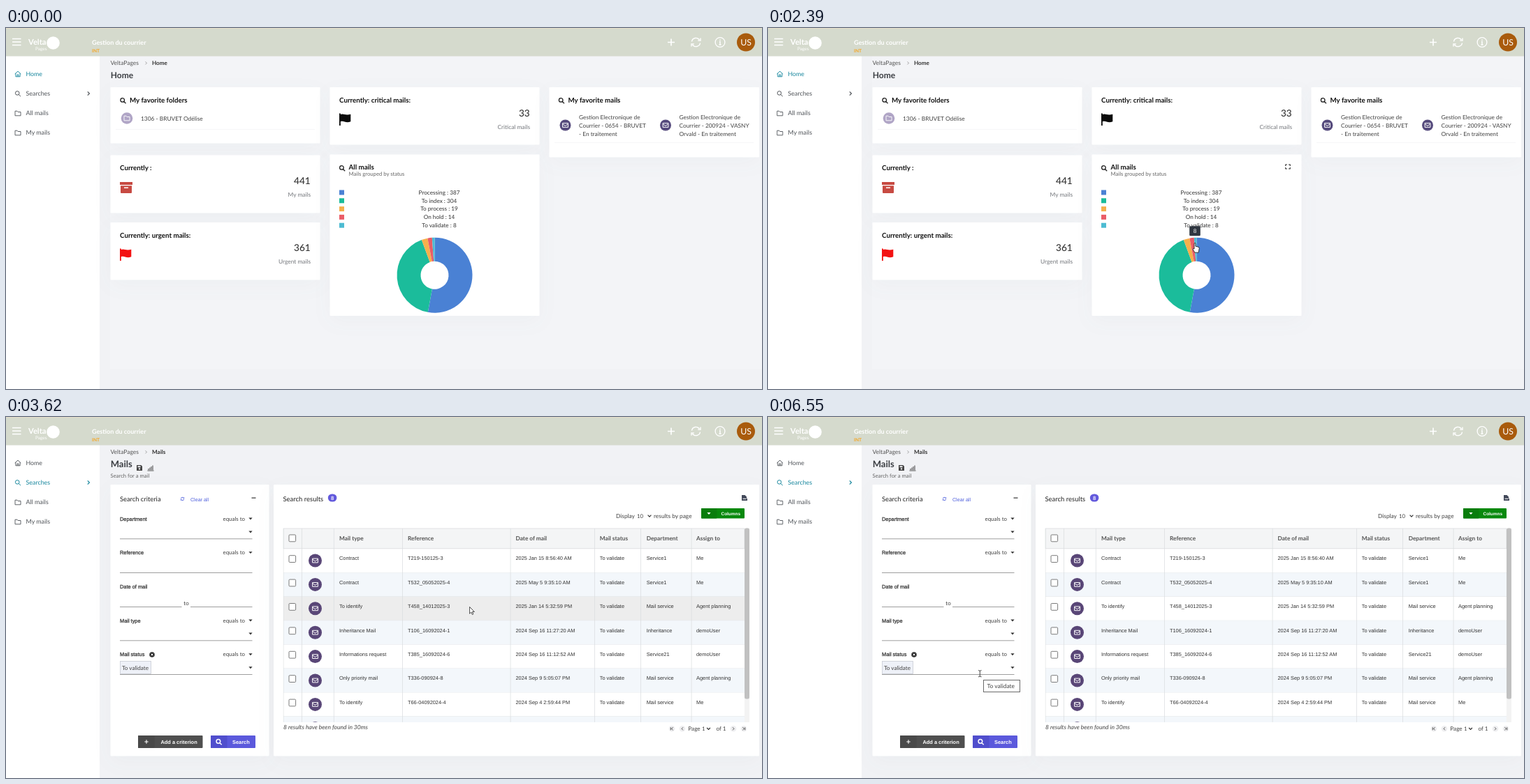
Write an HTML page that moves like this. It is 1082x518 px and loops after 7.17 s.

```html
<!DOCTYPE html>
<html lang="en">
<head>
<meta charset="utf-8">
<title>Mail dashboard</title>
<style>
html, body { margin: 0; width: 100%; height: 100%; overflow: hidden; background: #f1f2f5 }
svg { display: block; width: 100vw; height: 100vh; font-family: Lato, sans-serif; text-rendering: geometricPrecision }
.arial { font-family: "Liberation Sans", Arial, sans-serif }
.card { fill: #fff; filter: drop-shadow(0 8px 14px rgba(70, 80, 100, .03)) }
</style>
</head>
<body>
<svg id="stage" viewBox="0 0 1082 518"></svg>
<script>
const LOOP = 7170, MAILS_AT = 2850, NAMES_AT = 3080, TIP_AT = 6550;
const BOLD = 'font-weight="700"', END = 'text-anchor="end"', MID = 'text-anchor="middle"';
const ARIAL = 'class="arial"', TEAL = '#16869d';

// Drawing helpers returning SVG markup
const text = (x, y, s, size = 8.3, fill = '#444', more = '') =>
  `<text x="${x}" y="${y}" font-size="${size}" fill="${fill}" ${more}>${s}</text>`;
const rect = (x, y, w, h, fill, more = '') =>
  `<rect x="${x}" y="${y}" width="${w}" height="${h}" fill="${fill}" ${more}/>`;
const circle = (x, y, r, fill, more = '') => `<circle cx="${x}" cy="${y}" r="${r}" fill="${fill}" ${more}/>`;
const fill = (x, y, d, color) => `<path transform="translate(${x} ${y})" d="${d}" fill="${color}"/>`;
const line = (x, y, d, color, width = 1) =>
  `<path transform="translate(${x} ${y})" d="${d}" fill="none" stroke="${color}" stroke-width="${width}"/>`;
const card = (x, y, w, h) => rect(x, y, w, h, '#fff', 'class="card" rx="1"');

// Icons, centred on x, y
const lens = (x, y, c, w = 1.3) => line(x, y, 'M2 -.6A2.8 2.8 0 1 1 -3.6 -.6A2.8 2.8 0 1 1 2 -.6M1.2 1.5L4 4.2', c, w);
const folder = (x, y, c) => line(x, y, 'M-4 3.3V-3.3H-1L0 -2H4V3.3Z', c, .9);
const house = (x, y, c) => line(x, y, 'M-4.3 0L0 -3.9L4.3 0M-3.1 -1V3.8H3.1V-1M-1 3.8V1H1V3.8', c, .9);
const caret = (x, y, c = '#333') => fill(x, y, 'M-2.6 -1.4H2.6L0 1.5Z', c);
const chevron = (x, y, c = '#333') => line(x, y, 'M-2.4 -1.3L0 1.2L2.4 -1.3', c, 1.2);
const plus = (x, y, r, w) => line(x, y, `M${-r} 0H${r}M0 ${-r}V${r}`, '#fff', w);
const refresh = (x, y, s, c, w) => `<g transform="translate(${x} ${y}) scale(${s})">` +
  line(0, 0, 'M-6 -1A6 6 0 0 1 5 -3.3M6.5 -6V-2.4H2.7M6 1A6 6 0 0 1 -5 3.3M-6.5 6V2.4H-2.7', c, w) + '</g>';
const envelope = (x, y, r, c) => circle(x, y, r, c) +
  line(x, y, 'M-3.9 -2.9H3.9V2.9H-3.9ZM-3.9 -1.8L0 .9L3.9 -1.8', '#fff', 1);
const flag = (x, y, c) => fill(x, y, 'M0 0h1.8v17.5h-1.8zM1.8 1.6c4-2.2 6.5 2 14.5-.4v10.6c-7 2.8-10-1.8-14.5 0z', c);

function header() {
  return rect(0, 0, 1082, 40.5, '#d5dacd') + rect(0, 0, 1082, 1, '#e6dfca') +
    line(9, 15.5, 'M0 0H12.5M0 4.5H12.5M0 9H12.5', '#fff', 1.6) +
    circle(67.5, 21.5, 9.3, '#fff') +
    text(32, 24, 'Velta', 11.2, '#fff', BOLD) + text(42, 31.5, 'Pages', 6.5, '#fff') +
    text(123, 24, 'Gestion du courrier', 9, '#fff', BOLD) + text(123, 35, 'INT', 6.6, '#f5a623', BOLD) +
    plus(952, 20.5, 5, 1.6) + refresh(987.5, 20.5, 1, '#fff', 1.4) +
    circle(1022, 20.5, 6.9, 'none', 'stroke="#fff" stroke-width="1.3"') +
    line(1022, 20.5, 'M0 -4V-2.3M-1 -.7H0V3.5M-1.5 3.5H1.5', '#fff', 1.4) +
    circle(1059, 20.5, 13, '#a95b0c') + text(1059, 24.8, 'US', 12.3, '#fff', MID);
}

function frame(title, size, home) {
  const grey = '#4f5358', h = home ? TEAL : grey, s = home ? grey : TEAL;
  return rect(0, 40, 134, 478, '#fff') +
    house(17, 66, h) + text(28.5, 69, 'Home', 8.8, h) +
    lens(17, 94, s, 1) + text(28.5, 97, 'Searches', 8.9, s) + line(118, 94, 'M-1.2 -2.6L1.4 0L-1.2 2.6', s, 1.2) +
    folder(17, 122.5, grey) + text(28.5, 125.3, 'All mails', 8.9, grey) +
    folder(17, 150.5, grey) + text(28.5, 153.3, 'My mails', 8.9, grey) +
    text(149.5, 53, 'VeltaPages', 8.5, '#555') + line(200.5, 50.3, 'M-1 -2L1 0L-1 2', '#888', .8) +
    text(209, 53.3, title, 8.1, '#333', BOLD) + text(149.7, 72.3, title, size, '#3a3d42', BOLD);
}

function donut(cx, cy, R, r, parts) {
  const total = parts.reduce((sum, p) => sum + p[1], 0);
  const at = (a, d) => `${cx + d * Math.sin(a)} ${cy - d * Math.cos(a)}`;
  let a = 0;
  return parts.map(([, n, color]) => {
    const b = a + n / total * 2 * Math.PI, big = +(b - a > Math.PI);
    const d = `M${at(a, R)}A${R} ${R} 0 ${big} 1 ${at(b, R)}L${at(b, r)}A${r} ${r} 0 ${big} 0 ${at(a, r)}Z`;
    a = b;
    return fill(0, 0, d, color);
  }).join('');
}

function dashboard() {
  const title = (x, y, s) => text(x, y, s, 9.75, '#111', BOLD);
  const count = (x, y, n, label) => text(x, y, n, 13.6, '#333', END + ' font-weight="500"') +
    text(x + .3, y + 18, label, 8.35, '#74777c', END);
  const lines = (x, ...rows) => rows.map((s, i) => text(x, 131 + 12 * i, s)).join('');
  const parts = [['Processing', 387, '#4a81d4'], ['To index', 304, '#1bbc9b'], ['To process', 19, '#f6b04c'],
    ['On hold', 14, '#ea5d68'], ['To validate', 8, '#4dbbd2']];
  return rect(149, 40, 933, 449, '#f3f4f7') + frame('Home', 12, true) +
    card(149.5, 85, 300, 80.5) + lens(167.5, 104, '#222') + title(177, 107, 'My favorite folders') +
    circle(173, 129.5, 8.3, '#b0a5c6') + folder(173, 129.5, '#fff') +
    text(193, 133, '1306 - BRUVET Odélise', 8.4) + rect(157, 145, 285, .6, '#f1f1f3') +
    card(149.5, 182.5, 300, 83) + title(163, 204, 'Currently :') + count(435.7, 224, 441, 'My mails') +
    fill(163, 221, 'M0 0H18V4H0ZM1 5.2H17V15Q17 16 16 16H2Q1 16 1 15ZM6 7.5V9H12V7.5Z', '#c74a42') +
    card(149.5, 279, 300, 82.5) + title(163, 300.5, 'Currently: urgent mails:') +
    count(435.7, 320.3, 361, 'Urgent mails') + flag(163, 316.5, '#f31212') +
    card(463.5, 85, 300, 82.5) + title(477, 107, 'Currently: critical mails:') +
    count(749.7, 126.5, 33, 'Critical mails') + flag(477, 122.5, '#0b0b0b') +
    card(777.5, 85, 300.5, 100.5) + lens(795, 104, '#222') + title(804.5, 107, 'My favorite mails') +
    envelope(800.5, 139.5, 8, '#564b7d') + envelope(944, 139.5, 8, '#564b7d') +
    lines(820, 'Gestion Electronique de', 'Courrier - 0654 - BRUVET', '- En traitement') +
    lines(963.5, 'Gestion Electronique de', 'Courrier - 200924 - VASNY', 'Orvald - En traitement') +
    rect(785, 164, 285, .6, '#f1f1f3') +
    card(463.5, 181.5, 300, 231.5) + lens(481.2, 201, '#222') + title(490.5, 203.3, 'All mails') +
    text(490.5, 212.3, 'Mails grouped by status', 7.7, '#666') +
    parts.map(([name, n, color], i) => rect(477, 232.5 + 11.8 * i, 7, 7, color) +
      text(620, 238.7 + 11.8 * i, `${name} : ${n}`, 8.2, '#333', MID)).join('') +
    donut(613.5, 354.7, 54, 20, parts) +
    `<g id="expand">${line(744, 199, 'M-3.3 -1V-3H-1M1 -3H3.3V-1M3.3 1V3H1M-1 3H-3.3V1', '#333', 1.1)}</g>`;
}

function criteria() {
  const label = (y, s) => text(163, y + 2.7, s, 7.4, '#333', ARIAL + ' stroke="#333" stroke-width=".25"');
  const rule = (y, x = 163, w = 189.5) => rect(x, y, w, .9, '#949494');
  const field = (y, s, list) => label(y, s) + text(310.5, y + 2.5, 'equals to', 7.9, '#444') + caret(350, y) +
    (list ? caret(350, y + 19) : '') + rule(y + 28.4);
  const button = (x, w, s, c, dark, tx) => rect(x, 457, w, 18, c, 'rx="1"') + rect(x, 457, 23.5, 18, dark, 'rx="1"') +
    text(tx, 468.7, s, 7.4, '#fff', ARIAL + BOLD);
  return card(149.5, 97, 227, 389.5) + text(163, 120.5, 'Search criteria', 9.3, '#333', 'font-weight="500"') +
    refresh(252.5, 117.5, .36, '#4a5bdc', 2.4) + text(264, 120.5, 'Clear all', 7.1, '#4a5bdc', ARIAL) +
    rect(351.5, 115.5, 6, 1.2, '#333') +
    field(146, 'Department', true) + field(194.6, 'Reference') +
    label(243.5, 'Date of mail') + rule(272, 163, 88.5) + rule(272, 264, 88.5) + text(254.3, 270, 'to', 8) +
    field(292, 'Mail type', true) + field(340.7, 'Mail status', true) +
    circle(209, 341, 3.8, '#333') + line(209, 341, 'M-1.3 -1.3L1.3 1.3M1.3 -1.3L-1.3 1.3', '#fff', 1) +
    rect(163.5, 350.5, 44, 18, '#eef1f8', 'stroke="#c9ccd4" stroke-width=".8"') + text(166, 363, 'To validate', 8.15) +
    button(189, 92.5, 'Add a criterion', '#4f4f4f', '#494949', 221.5) + plus(201, 466, 2.7, 1.1) +
    button(293, 64, 'Search', '#5b59dc', '#504ecd', 324) + lens(304.7, 466, '#fff', 1.5);
}

const TOP = 189, ROW = 34.4, COLUMNS = [477, 575, 729.5, 849.7, 916.7, 988];
const MAILS = `Contract|T219-150125-3|2025 Jan 15 8:56:40 AM|Service1|Me
Contract|T532_05052025-4|2025 May 5 9:35:10 AM|Service1|Me
To identify|T458_14012025-3|2025 Jan 14 5:32:59 PM|Mail service|agent
Inheritance Mail|T106_16092024-1|2024 Sep 16 11:27:20 AM|Inheritance|demoUser
Informations request|T385_16092024-6|2024 Sep 16 11:12:52 AM|Service21|demoUser
Only priority mail|T336-090924-8|2024 Sep 9 5:05:07 PM|Mail service|agent
To identify|T66-04092024-4|2024 Sep 4 2:59:44 PM|Mail service|Me
|||| `.split('\n').map(row => row.split('|'));

function results() {
  const box = y => rect(405, y - 5, 9.6, 9.8, '#fff', 'rx="1.2" stroke="#6b6b6b" stroke-width=".9"');
  const row = ([type, ref, date, dept, who], i) => {
    const y = TOP + ROW * i;
    const cells = [type, ref, date, type && 'To validate', dept, who];
    return rect(397, y, 660, ROW, '#fff', 'class="row"') + rect(397, y + ROW - .4, 660, .7, '#dcdfe3') +
      box(y + 14.7) + envelope(442.5, y + 17, 9.5, '#594677') +
      cells.map((s, c) => text(COLUMNS[c], y + 16.3, s, 7.4, '#333',
        s === 'agent' ? 'class="arial agent"' : ARIAL)).join('');
  };
  const pager = (x, d) => circle(x, 447.3, 4.3, '#eeeef0') + line(x, 447.3, d, '#555', 1);
  const heads = ['Mail type', 'Reference', 'Date of mail', 'Mail status', 'Department', 'Assign to'];
  return card(383, 97, 695, 389.5) + text(396.5, 120.5, 'Search results', 9.45, '#333', 'font-weight="500"') +
    rect(460.8, 110.5, 12.6, 11, '#6259dc', 'rx="5.5"') + text(467.1, 118.7, '8', 7.4, '#fff', BOLD + MID) +
    fill(1053, 112, 'M0 0H4.5L7 2.5V5H8V8H0Z', '#43495a') + rect(1054.5, 116.8, 5, 1, '#fff') +
    text(873, 145, 'Display', 8.35) + text(903, 145, '10', 7.8) + chevron(921, 142) + text(927, 145, 'results by page', 8.35) +
    rect(995, 131, 62, 14.6, '#08890d', 'rx="1"') + rect(995, 131, 22.5, 14.6, '#097d0d', 'rx="1"') +
    caret(1006, 138.5, '#fff') + text(1023.5, 140.7, 'Columns', 6.45, '#fff', ARIAL + BOLD) +
    '<clipPath id="view"><rect x="396.5" y="159" width="661" height="279"/></clipPath><g clip-path="url(#view)">' +
    MAILS.map(row).join('') +
    rect(397, 160, 660, 28.8, '#f4f5f6', 'stroke="#d9dbde" stroke-width=".8"') + box(174) +
    heads.map((s, i) => text(COLUMNS[i], 176.6, s, 8.3, '#555', BOLD)).join('') +
    [397, 423.3, 469.2, 567.5, 722, 842.3, 908.5, 981].map(x => rect(x - .3, 160, .7, 278, '#d9dcdf')).join('') + '</g>' +
    rect(1057, 159.5, 7, 278.5, '#f3f3f3') + rect(1057, 159.5, 7, 245, '#c1c1c1', 'rx="2.5"') +
    text(397, 447.5, '8 results have been found in 30ms', 8.5, '#444', 'font-style="italic"') +
    pager(953, 'M-1.7 -2V2M1.7 -2L-.5 0L1.7 2') + pager(968, 'M1 -2L-1 0L1 2') +
    text(976.3, 450, 'Page', 8.2) + text(996, 450.2, '1', 7.8) + chevron(1005.5, 447.3) + text(1016.5, 450, 'of 1', 8.2) +
    pager(1041, 'M-1 -2L1 0L-1 2') + pager(1056, 'M1.7 -2V2M-1.7 -2L.5 0L-1.7 2');
}

const mailsPage = () => frame('Mails', 13, false) +
  fill(187, 69, 'M0 0H6.3L8 1.7V8H0ZM1.5 1.2V3.2H5.5V1.2ZM4 4.2A1.2 1.2 0 0 0 4 6.6A1.2 1.2 0 0 0 4 4.2Z', '#444') +
  line(207, 77, 'M-4.5 0H4.5M-3 -1V-3M-1 -1V-4.5M1 -1V-6M3 -1V-7.5', '#555', 1.1) +
  text(149.5, 87, 'Search for a mail', 7.7, '#666') + criteria() + results() +
  `<g id="valueTip">${rect(308.5, 377.5, 52, 17, '#fff', 'stroke="#6a6a6a"')}${text(313.5, 389, 'To validate', 8.45)}</g>`;

const POINTERS = {
  arrow: '<path d="M0 0V9.7L2.2 7.6L3.8 11L5.3 10.3L3.8 7H6.8Z" fill="#fff" stroke="#222" stroke-width=".8"/>',
  hand: '<path d="M-1 .9Q0 -.8 1 .9V5L5 6Q6.4 6.5 6.2 8.2L5.2 14H-.2L-3 9.3Q-3 7.6 -1 8.8Z" fill="#fff" stroke="#222" stroke-width=".9"/>',
  beam: line(0, 0, 'M-2.2 -4.6Q0 -4.6 0 -3.6Q0 -4.6 2.2 -4.6M0 -4V4M-2.2 4.6Q0 4.6 0 3.6Q0 4.6 2.2 4.6', '#333', .9)
};

// Pointer route: time, x, y, shape from then on
const ROUTE = [[450, 962, 171, 'arrow'], [1150, 626, 320], [1230, 626, 320], [1520, 613.5, 311.5], [1840, 613.5, 311.5],
  [1910, 611, 308.2], [2849, 611, 308.2], [MAILS_AT, 612.5, 310, 'beam'], [3320, 612.5, 310, 'arrow'], [3620, 664, 273],
  [3990, 504, 74], [4080, 504, 74], [4300, 388, 100], [4500, 405, 150], [4720, 503, 116], [4860, 503, 116],
  [5120, 329.3, 271.6, 'beam'], [5210, 290, 295, 'arrow'], [5530, 134, 345], [5600, 134, 345], [5760, 175, 406],
  [5920, 255, 400], [6000, 280, 385, 'beam'], [6090, 303.3, 368.2], [LOOP, 303.3, 368.2]];

const group = (id, body) => `<g id="${id}">${body}</g>`;
const $ = id => document.getElementById(id);
$('stage').innerHTML = rect(0, 0, 1082, 518, '#f1f2f5') +
  group('homeScene', dashboard()) + group('mailScene', mailsPage()) + header() +
  group('chartTip', rect(-7.8, -7, 15.6, 14, '#2f3640', 'id="tipBox" rx="1.5"') + text(0, 2.9, '8', 8, '#fff', 'id="tipText" ' + MID)) +
  group('pointer', Object.keys(POINTERS).map(k => group(k, POINTERS[k])).join(''));

const show = (id, on) => $(id).style.display = on ? '' : 'none';
const move = (id, x, y) => $(id).setAttribute('transform', `translate(${x} ${y})`);
const rows = document.querySelectorAll('.row'), agents = document.querySelectorAll('.agent');

function pointerAt(t) {
  let i = 0, shape = 'arrow';
  while (i < ROUTE.length - 2 && ROUTE[i + 1][0] <= t) shape = ROUTE[++i][3] || shape;
  const [t0, x0, y0] = ROUTE[i], [t1, x1, y1] = ROUTE[i + 1];
  const k = Math.max(0, (t - t0) / (t1 - t0));
  return { x: x0 + (x1 - x0) * k, y: y0 + (y1 - y0) * k, shape };
}

function draw(t) {
  const home = t < MAILS_AT, visible = t >= 450, p = pointerAt(t);
  const onChart = home && visible && Math.hypot(p.x - 613.5, p.y - 354.7) < 54;
  const value = p.x < 614.5 ? 8 : 387, half = value === 8 ? 7.8 : 11.8;
  if (onChart) p.shape = 'hand';
  show('homeScene', home);
  show('mailScene', !home);
  show('expand', visible && p.x < 763.5 && p.y > 181.5);
  show('chartTip', onChart);
  move('chartTip', p.x, p.y - 17);
  $('tipText').textContent = value;
  $('tipBox').setAttribute('x', -half);
  $('tipBox').setAttribute('width', 2 * half);
  show('valueTip', t >= TIP_AT);
  const hovered = p.x > 397 && p.x < 1057 ? Math.floor((p.y - TOP) / ROW) : -1;
  rows.forEach((r, i) => r.setAttribute('fill', i === hovered ? '#ededed' : i % 2 ? '#f3f7fb' : '#fff'));
  agents.forEach(a => a.textContent = t < NAMES_AT ? 'agent_planning' : 'Agent planning');
  show('pointer', visible);
  move('pointer', p.x, p.y);
  for (const k in POINTERS) show(k, k === p.shape);
}

const start = performance.now();
(function tick() {
  draw((performance.now() - start) % LOOP);
  requestAnimationFrame(tick);
})();
</script>
</body>
</html>
```
